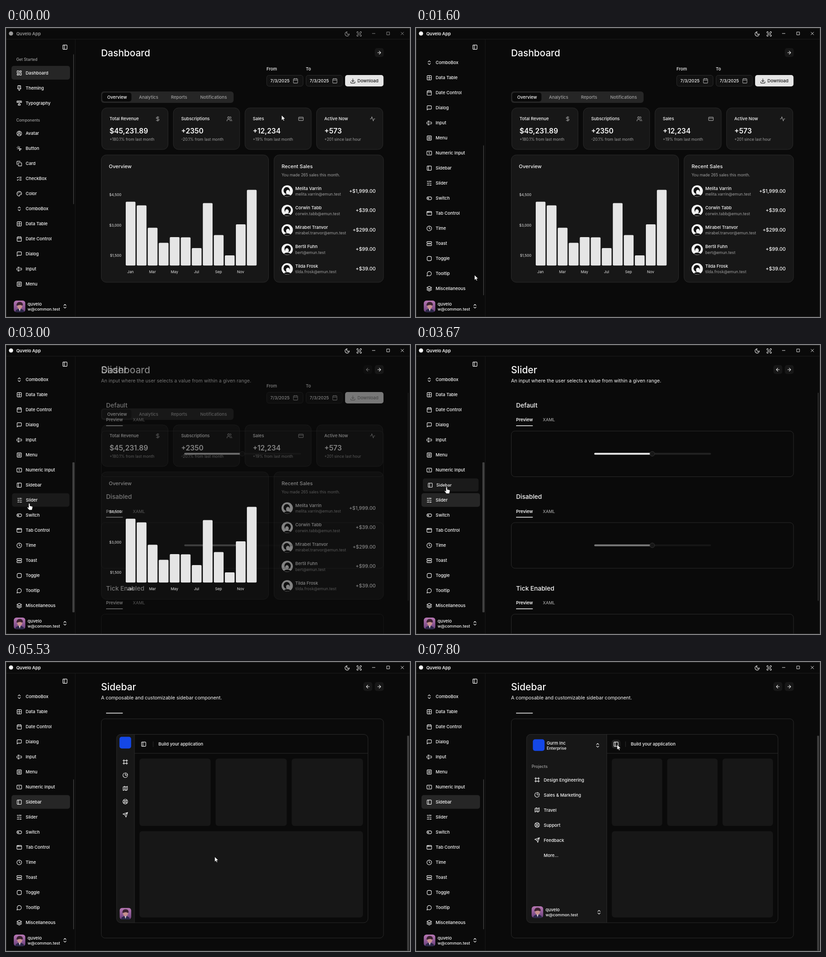
Write an HTML page that moves like this. It is 884 px wide and 633 px high and loops after 8 s.

```html
<!DOCTYPE html>
<html lang="en">
<head>
<meta charset="utf-8">
<title>Dashboard demo</title>
<style>
html, body { margin: 0; width: 100%; height: 100%; overflow: hidden; background: #0a0a0a; }
svg { display: block; font-family: Inter, "Open Sans", sans-serif; }
text { dominant-baseline: central; white-space: pre; }
</style>
</head>
<body>
<svg id="stage" width="884" height="633" viewBox="0 0 884 633"></svg>
<script>
const WHITE = '#fafafa', GRAY = '#a1a1a1', LIGHT = '#e5e5e5', CARD = '#171717', LINE = '#2b2b2b', BG = '#0a0a0a';

// path pieces on a 24 unit grid
const box = (x, y, w, h, r = 2) =>
  `M${x + r} ${y}h${w - 2 * r}a${r} ${r} 0 0 1 ${r} ${r}v${h - 2 * r}a${r} ${r} 0 0 1 ${-r} ${r}h${2 * r - w}a${r} ${r} 0 0 1 ${-r} ${-r}v${2 * r - h}a${r} ${r} 0 0 1 ${r} ${-r}z`;
const ring = (x, y, r) => `M${x - r} ${y}a${r} ${r} 0 1 0 ${2 * r} 0a${r} ${r} 0 1 0 ${-2 * r} 0z`;
const square = box(3, 3, 18, 18);

const ICONS = {
  Dashboard: box(3, 3, 7, 9, 1) + box(14, 3, 7, 5, 1) + box(14, 12, 7, 9, 1) + box(3, 16, 7, 5, 1),
  Theming: 'M10 2v2M14 2v4M17 2a1 1 0 0 1 1 1v9H6V3a1 1 0 0 1 1-1zM6 12a1 1 0 0 0-1 1v1a2 2 0 0 0 2 2h2a1 1 0 0 1 1 1v3a2 2 0 1 0 4 0v-3a1 1 0 0 1 1-1h2a2 2 0 0 0 2-2v-1a1 1 0 0 0-1-1',
  Typography: 'M14 17h1a2 2 0 0 1 0 4H9a2 2 0 0 1 0-4h1V7H6v1a2 2 0 0 1-4 0V5a2 2 0 0 1 2-2h16a2 2 0 0 1 2 2v3a2 2 0 0 1-4 0V7h-4z',
  Avatar: ring(12, 12, 10) + ring(12, 10, 4) + 'M18 20a6 6 0 0 0-12 0',
  Button: 'M14 4.1 12 6M5.1 8l-2.9-.8M6 12l-1.9 2M7.2 2.2 8 5.1M9 9l12 5-5 1.5-1.5 5.5z',
  Card: box(8, 8, 14, 14) + 'M4 16a2 2 0 0 1-2-2V4a2 2 0 0 1 2-2h10a2 2 0 0 1 2 2',
  CheckBox: 'M3 17l2 2 4-4M3 7l2 2 4-4M13 6h8M13 12h8M13 18h8',
  Color: 'M12 2a10 10 0 0 0 0 20c1 0 1.6-.7 1.6-1.7 0-.8-.8-1.2-.8-2.2a1.6 1.6 0 0 1 1.7-1.7h2c3 0 5.5-2.5 5.5-5.5C22 6 17.5 2 12 2z' + ring(13.5, 6.5, .5) + ring(17.5, 10.5, .5) + ring(8.5, 7.5, .5) + ring(6.5, 12.5, .5),
  ComboBox: 'M7 15l5 5 5-5M7 9l5-5 5 5',
  'Data Table': square + 'M12 3v18M3 12h18',
  'Date Control': box(3, 4, 18, 18) + 'M8 2v4M16 2v4M3 10h18',
  Dialog: 'M21 15a2 2 0 0 1-2 2H7l-4 4V5a2 2 0 0 1 2-2h14a2 2 0 0 1 2 2z',
  Input: 'M12 20h-1a2 2 0 0 1-2-2 2 2 0 0 1-2 2H6M13 8h7a2 2 0 0 1 2 2v4a2 2 0 0 1-2 2h-7M5 16H4a2 2 0 0 1-2-2v-4a2 2 0 0 1 2-2h1M6 4h1a2 2 0 0 1 2 2 2 2 0 0 1 2-2h1M9 6v12',
  Menu: square + 'M7 8h10M7 12h10M7 16h10',
  'Numeric Input': box(2, 4, 20, 16) + 'M10 9h2v6',
  Sidebar: square + 'M9 3v18',
  Slider: 'M21 4h-7M10 4H3M21 12h-9M8 12H3M21 20h-5M12 20H3M14 2v4M8 10v4M16 18v4',
  Switch: box(2, 6, 20, 12, 6) + ring(8, 12, 2),
  'Tab Control': box(2, 4, 20, 16) + 'M2 8h20M6 4v4M10 4v4',
  Time: ring(12, 12, 10) + 'M12 6v6l4 2',
  Toast: box(2, 4, 20, 7) + box(2, 14, 20, 7),
  Toggle: box(3, 3, 18, 18, 5),
  Tooltip: 'M7.9 20A9 9 0 1 0 4 16.1L2 22z',
  Miscellaneous: 'M12 2 2 7l10 5 10-5zM2 12l10 5 10-5M2 17l10 5 10-5',
  moon: 'M12 3a6 6 0 0 0 9 9 9 9 0 1 1-9-9z',
  scan: 'M3 8V3h5M16 3h5v5M21 16v5h-5M8 21H3v-5' + box(7, 8, 10, 8),
  left: 'M12 19l-7-7 7-7M19 12H5',
  right: 'M5 12h14M12 5l7 7-7 7',
  download: 'M21 15v4a2 2 0 0 1-2 2H5a2 2 0 0 1-2-2v-4M7 10l5 5 5-5M12 15V3',
  dollar: 'M12 2v20M17 5H9.5a3.5 3.5 0 0 0 0 7h5a3.5 3.5 0 0 1 0 7H6',
  users: ring(9, 7, 4) + 'M16 21v-2a4 4 0 0 0-4-4H6a4 4 0 0 0-4 4v2M22 21v-2a4 4 0 0 0-3-3.9M16 3.1a4 4 0 0 1 0 7.8',
  credit: box(2, 5, 20, 14) + 'M2 10h20',
  pulse: 'M22 12h-4l-3 9L9 3l-3 9H2',
  frame: 'M22 6H2M22 18H2M6 2v20M18 2v20',
  pie: 'M22 12a10 10 0 0 0-10-10v10zM21.2 15.9A10 10 0 1 1 8 2.8',
  map: 'M3 6l6-3 6 3 6-3v15l-6 3-6-3-6 3zM9 3v15M15 6v15',
  buoy: ring(12, 12, 10) + ring(12, 12, 4) + 'M5 5l4 4M15 9l4-4M15 15l4 4M9 15l-4 4',
  send: 'M22 2 11 13M22 2l-7 20-4-9-9-4z'
};

// markup helpers; text and icons are placed by their middle
const text = (x, y, s, size = 9.5, fill = WHITE, weight = 500, anchor = 'start') =>
  `<text x="${x}" y="${y}" font-size="${size}" fill="${fill}" font-weight="${weight}" text-anchor="${anchor}">${s}</text>`;
const rect = (x, y, w, h, r, fill, stroke = 'none', more = '') =>
  `<rect x="${x}" y="${y}" width="${w}" height="${h}" rx="${r}" fill="${fill}" stroke="${stroke}" ${more}/>`;
const icon = (x, y, name, color = WHITE, size = 12.4) =>
  `<path transform="translate(${x - size / 2} ${y - size / 2}) scale(${size / 24})" d="${ICONS[name]}" fill="none" stroke="${color}" stroke-width="2.1" stroke-linecap="round" stroke-linejoin="round"/>`;
const group = (id, body, more = '') => `<g id="${id}" ${more}>${body}</g>`;

const portrait = (x, y) => `<g transform="translate(${x} ${y})" clip-path="url(#face)">
  <rect width="25.5" height="25.5" fill="url(#pink)"/>
  <path d="M3 26q1-8 10-8t10 8z" fill="#2c2848"/><path d="M11 18h4l-2 6z" fill="#d9cfe0"/>
  <ellipse cx="13" cy="12" rx="5.5" ry="6.5" fill="#c58f8d"/><path d="M6 11q0-8 7-8t7 7l-2 1q-4-3-10 0z" fill="#3d2231"/></g>`;
const user = (x, y) => text(x, y, 'quvelo', 9.6) + text(x, y + 10.8, 'w@common.test', 8.8);
const navButton = (x, name) => rect(x, 44, 19.5, 19.5, 5, CARD) + icon(x + 9.7, 54, name, WHITE, 11.5);
const tabs = y => text(219, y, 'Preview', 9.5, WHITE, 600) + text(277.5, y, 'XAML', 9.2, GRAY) + rect(219, y + 12.3, 36.5, 1.5, 0, WHITE);

// left menu
const names = Object.keys(ICONS).slice(0, 24);
const itemY = names.map((n, i) => i < 3 ? 98 + 33 * i : 230.5 + 33 * (i - 3));
const menu = text(22.5, 69, 'Get Started', 8.5, GRAY) + text(22.5, 201.5, 'Components', 8.5, GRAY) +
  names.map((n, i) => `<g class="item">${rect(12, itemY[i] - 15, 128, 30, 5, 'none')}${icon(29, itemY[i] + .5, n)}${text(43, itemY[i], n)}</g>`).join('');

// dashboard page
const stats = [
  ['Total Revenue', '$45,231.89', '+180.1% from last month', 'dollar'],
  ['Subscriptions', '+2350', '-20.1% from last month', 'users'],
  ['Sales', '+12,234', '+19% from last month', 'credit'],
  ['Active Now', '+573', '+201 since last hour', 'pulse']
].map(([a, b, c, ic], i) => {
  const x = 209.5 + 156.7 * i;
  return rect(x, 175, 145, 91, 11, CARD, LINE) + text(x + 17, 198.5, a) + text(x + 17, 225, b, 15.4, WHITE, 600) +
    text(x + 17, 243.5, c, 8.5, GRAY, 400) + icon(x + 122.5, 199, ic, GRAY);
}).join('');

const sales = [
  ['Melita Varrin', 'melita.varrin', '1,999'], ['Corwin Tabb', 'corwin.tabb', '39'],
  ['Mirabel Tranvor', 'mirabel.tranvor', '299'], ['Bertil Fuhn', 'bert', '99'], ['Tilda Frosk', 'tilda.frosk', '39']
].map(([n, mail, sum], i) => {
  const y = 357 + 42.6 * i, lean = i % 2 ? 1 : -1;
  return `<g><circle cx="615.3" cy="${y}" r="12.4" fill="#f4f4f4"/>
    <path d="M608 ${y + 10}q7 -6 15 0q-7 4 -15 0" fill="#111"/>
    <ellipse cx="${615.3 + lean}" cy="${y - 1}" rx="7" ry="7.5" fill="#111"/>
    <ellipse cx="${615.8 - lean}" cy="${y + 2.5}" rx="4" ry="5" fill="#f4f4f4"/></g>` +
    text(633, y - 6, n) + text(633, y + 7, mail + '@emun.test', 8.7, GRAY, 400) +
    text(809, y, `+$${sum}.00`, 10.7, WHITE, 500, 'end');
}).join('');

const dateBox = (x, label) => text(x, 89.5, label) + rect(x + .5, 103.5, 79.5, 24, 5, '#121212', LINE) +
  text(x + 8.5, 115.5, '7/3/2025') + icon(x + 63.5, 115.5, 'Date Control', GRAY);

const dash = text(208, 54, 'Dashboard', 20.6) + dateBox(570, 'From') + dateBox(656, 'To') +
  rect(742, 103, 84, 25, 5, LIGHT) + icon(759, 116, 'download', '#222') + text(769, 115.5, 'Download', 9.6, '#171717') +
  rect(208, 139, 290, 25, 6, '#262626') + rect(210.5, 141.5, 64, 19.5, 5, BG) + text(221.5, 151.5, 'Overview') +
  text(291, 151.5, 'Analytics', 9.5, GRAY) + text(361, 151.5, 'Reports', 9.5, GRAY) + text(425, 151.5, 'Notifications', 9.6, GRAY) +
  stats + rect(208.5, 278, 366, 279, 11, CARD, LINE) + rect(586.5, 278, 239.5, 279, 11, CARD, LINE) +
  text(225, 302.5, 'Overview', 11) + text(603, 302.5, 'Recent Sales', 11) +
  text(603, 322, 'You made 265 sales this month.', 8.5, GRAY, 400) + sales;

const tops = [380.5, 388.5, 437.5, 470.5, 458, 458.5, 482, 383.5, 453.5, 498, 430, 354.5];
const chart = tops.map((y, i) => rect(262 + 24.1 * i, y, 21.3, 520.3 - y, 2, LIGHT)).join('') +
  ['Jan', 'Mar', 'May', 'Jul', 'Sep', 'Nov'].map((m, i) => text(272.3 + 48.2 * i, 534, m, 8.2, LIGHT, 400, 'middle')).join('') +
  ['$4,500', '$3,000', '$1,500'].map((s, i) => text(252.5, 365 + 66.5 * i, s, 7.9, LIGHT, 400, 'end')).join('');

// slider page
const sliderPage = text(208, 54, 'Slider', 20.8) +
  text(208, 78.5, 'An input where the user selects a value from within a given range.', 10.55, WHITE, 400) +
  ['Default', 'Disabled', 'Tick Enabled'].map((s, i) => `<g transform="translate(0 ${200.5 * i})">` +
    text(219, 131.5, s, 13.6) + tabs(163.7) + rect(208.5, 188.5, 617.5, 100, 8, 'none', LINE) +
    (i < 2 ? `<g opacity="${i ? .5 : 1}">` + rect(390, 236.3, 255.5, 4, 2, '#222') + rect(390, 236.3, 127, 4, 2, LIGHT) + '</g>' +
      `<circle cx="517" cy="238.3" r="5.2" fill="${CARD}" stroke="#333"/>` : '') + '</g>').join('');

// sidebar page, laid out at its scrolled position
const projects = [['frame', 'Design Engineering'], ['pie', 'Sales &amp; Marketing'], ['map', 'Travel'], ['buoy', 'Support'], ['send', 'Feedback']];
const demo = text(219, 66.5, 'Default', 13.6) + tabs(98.9) + rect(208.5, 124.5, 617.5, 480, 8, 'none', LINE) +
  '<g clip-path="url(#inner)">' + rect(242, 158, 0, 413, 0, CARD, 'none', 'id="panel"') +
  rect(249, 165, 162, 34, 6, '#262626', 'none', 'id="teamHover"') + group('team', rect(-12.8, -12.8, 25.6, 25.6, 5, '#1447e6')) +
  projects.map(([n]) => `<g class="tool">${icon(0, 0, n)}</g>`).join('') + group('face2', portrait(0, 0)) +
  '<g clip-path="url(#panelClip)">' + group('labels', text(286, 177.5, 'Gurm Inc') + text(286, 188.3, 'Enterprise', 8.8) + icon(397.5, 182.5, 'ComboBox') +
    text(253, 228.5, 'Projects', 9, GRAY) + projects.map(([, s], i) => text(279.5, 258 + 33 * i, s)).join('') +
    text(279.5, 423, 'More...') + user(283.5, 542.5) + icon(400.5, 548, 'ComboBox')) + '</g>' +
  group('head', rect(0, 158, 1, 413, 0, LINE) + rect(0, 199.5, 600, 1, 0, LINE) + rect(11.5, 170.5, 18.5, 18.5, 5, '#222', 'none', 'id="toggleHover"') +
    icon(20.7, 180, 'Sidebar') + rect(41, 174, 1, 12, 0, LINE) + text(53, 179.5, 'Build your application')) +
  Array.from({ length: 4 }, () => rect(0, 211.5, 0, 147.5, 6, CARD, 'none', 'class="tile"')).join('') + '</g>' +
  rect(242, 158.5, 550, 412.5, 9, 'none', LINE);
const sidebarPage = text(208, 54, 'Sidebar', 20.8) + text(208, 78.5, 'A composable and customizable sidebar component.', 10.55, WHITE, 400) +
  `<g clip-path="url(#view)">${group('demo', demo)}</g>`;

const clip = (id, body) => `<clipPath id="${id}">${body}</clipPath>`;
stage.innerHTML = '<defs>' +
  '<linearGradient id="pink" x2="0" y2="1"><stop stop-color="#b878b4"/><stop offset="1" stop-color="#6a3f7c"/></linearGradient>' +
  clip('face', rect(0, 0, 25.5, 25.5, 6)) + clip('list', rect(0, 58, 152, 528, 0)) + clip('view', rect(152, 104.5, 732, 529, 0)) +
  clip('inner', rect(242, 158, 550, 413, 9)) + clip('panelClip', rect(242, 158, 0, 413, 0, BG, 'none', 'id="panelCut"')) + '</defs>' +
  rect(0, 0, 884, 633, 0, BG) + rect(0, 24, 884, 1, 0, '#1c1c1c') + rect(151, 25, 1, 608, 0, '#181818') +
  group('bar', `<circle cx="11" cy="12" r="4.6" fill="${WHITE}"/>` + text(22.5, 12, 'Quvelo App', 9.5, WHITE, 600) +
    icon(746.5, 13, 'moon') + icon(772.7, 13, 'scan') +
    `<path d="M801 12h7M833 8.8h6.2v6.2h-6.2zM864 8.8l6.5 6.5m0-6.5l-6.5 6.5" fill="none" stroke="${WHITE}" stroke-width=".9"/>`) +
  icon(129, 42, 'Sidebar') + `<g clip-path="url(#list)">${group('menu', menu)}</g>` +
  rect(0, 0, 0, 328.5, 1.2, '#404040', 'none', 'id="thumb"') +
  portrait(17, 597) + user(47.3, 604.3) + icon(129, 609.5, 'ComboBox') +
  group('dash', dash) + group('slider', sliderPage) + group('side', sidebarPage) + group('chart', chart) +
  group('back', navButton(782, 'left')) + navButton(807, 'right') +
  rect(0, 0, 0, 0, 1, '#404040', 'none', 'id="pageThumb"') + rect(.5, .5, 883, 632, 0, 'none', '#303030') +
  group('arrow', '<path d="M0 0v11.2l2.6-2.3 1.7 3.7 1.9-.9-1.7-3.6h3.6z" fill="#fff" stroke="#000" stroke-width=".7"/>') +
  group('hand', '<path d="M-1.5 1.2a1.4 1.4 0 0 1 2.8 0v4l5 1.2q1 .4 1 1.6l-.7 4-1 2.6h-6l-4-5q-.4-1.6 1-1.6l1.9 1.4z" fill="#fff" stroke="#000" stroke-width=".7"/>');

const $ = id => document.getElementById(id);
const all = q => [...stage.querySelectorAll(q)];
const items = all('.item'), tools = all('.tool'), tiles = all('.tile'), dashParts = all('#dash > *');
const put = (el, attrs) => { for (const k in attrs) el.setAttribute(k, attrs[k]); };
const move = (el, x, y) => put(el, { transform: `translate(${x} ${y})` });
const show = (id, o) => put($(id), { opacity: o, display: o > 0 ? 'inline' : 'none' });
const mix = (a, b, p) => a + (b - a) * p;
const ramp = (t, a, b) => Math.min(1, Math.max(0, (t - a) / (b - a)));
const ease = p => p * p * (3 - 2 * p);

// linear track of [time, ...values]
function track(t, keys) {
  const i = keys.findIndex(k => k[0] > t);
  if (i < 0) return keys.at(-1).slice(1);
  if (!i) return keys[0].slice(1);
  const a = keys[i - 1], b = keys[i], p = ramp(t, a[0], b[0]);
  return a.slice(1).map((v, j) => mix(v, b[j + 1], p));
}
const POINTER = [[70, 603, 191], [560, 132, 297], [730, 146, 309], [870, 146, 309], [1070, 146, 317], [1450, 147, 508.5],
  [1600, 128, 541], [1800, 128, 541], [2330, 51, 347], [3330, 51, 347], [3570, 67, 311], [4070, 67, 311], [4670, 305, 246],
  [4870, 305, 246], [5000, 457, 427], [5530, 457, 427], [6000, 306, 187], [6070, 306, 187], [6270, 302, 179], [7200, 302, 179], [7800, 440, 181]];
const PRESS = {
  Slider: [[2600, 1], [2700, .95], [2900, .95], [3060, 1]],
  Sidebar: [[3570, 1], [3660, .953], [3740, .953], [3900, 1]]
};

function draw(t) {
  const [x, y] = track(t, POINTER);
  const dragging = t >= 870 && t < 1800;
  const drag = t < 870 ? 0 : t < 1450 ? y - 309 : 199.5;
  const scroll = drag * 1.604;
  const inList = x > 12 && x < 140 && y > 58 && y < 586 && !dragging;
  const selected = t < 3060 ? 'Dashboard' : t < 3760 ? 'Slider' : 'Sidebar';

  put($('bar'), { opacity: t < 870 ? .6 : 1 });
  move($('menu'), 0, -scroll);
  let hovering = false;
  items.forEach((el, i) => {
    const over = inList && Math.abs(y - itemY[i] + scroll) < 15;
    hovering ||= over;
    put(el.firstChild, { fill: names[i] === selected ? '#262626' : over ? '#1a1a1a' : 'none' });
    const s = PRESS[names[i]] ? track(t, PRESS[names[i]])[0] : 1;
    put(el, { transform: `translate(${76 * (1 - s)} ${itemY[i] * (1 - s)}) scale(${s})` });
  });
  const wide = track(t, [[520, 0], [620, 1], [1480, 1], [1580, 0], [1800, 0], [1900, 1], [4250, 1], [4350, 0]])[0];
  put($('thumb'), { x: mix(147, 145.3, wide), y: 57.5 + drag, width: mix(1.5, 4.7, wide) });

  // pages: the dashboard fades part by part, its chart stays until the end
  const toSlider = ramp(t, 2890, 3140), toSide = ramp(t, 3680, 3940);
  const dashFade = 1 - ramp(t, 2860, 3140);
  dashParts.forEach(el => put(el, { opacity: dashFade }));
  show('chart', t < 3130 ? 1 : 0);
  show('slider', toSlider * (1 - toSide));
  show('side', toSide);
  show('back', toSlider);
  const pageScroll = ease(ramp(t, 5180, 5420));
  const thick = ramp(t, 4250, 4400), sidePage = toSide > .5;
  put($('pageThumb'), { x: mix(879.3, 877.8, thick), width: mix(1.5, 4.2, thick), y: 104.5 + 57 * pageScroll,
    height: sidePage ? 472 : 456, opacity: toSlider });
  move($('demo'), 0, 65 * (1 - pageScroll));

  // inner sidebar opening
  const open = ease(ramp(t, 6500, 6870)), edge = mix(281, 417.5, open);
  put($('panel'), { width: edge - 242 });
  put($('panelCut'), { width: edge - 242 });
  put($('labels'), { opacity: open });
  move($('head'), edge - .5, 0);
  move($('team'), mix(261, 268.5, open), mix(176.6, 182, open));
  move($('face2'), mix(248.5, 253, open), mix(538.5, 535, open));
  tools.forEach((el, i) => move(el, mix(261, 265, open), mix(219 + 28.9 * i, 258 + 33 * i, open)));
  const left = edge + 11, w = (781 - left - 21.5) / 3;
  tiles.forEach((el, i) => put(el, i < 3 ? { x: left + i * (w + 10.75), width: w } : { x: left, y: 370.5, width: 781 - left, height: 189 }));
  put($('toggleHover'), { opacity: sidePage && Math.abs(x - edge - 20.5) < 10 && Math.abs(y - 180) < 10 ? 1 : 0 });
  put($('teamHover'), { opacity: open === 1 && x < 411 ? 1 : 0 });

  show('hand', hovering ? 1 : 0);
  show('arrow', hovering ? 0 : 1);
  move($('hand'), x, y);
  move($('arrow'), x, y);
}

const start = performance.now();
(function loop() {
  draw((performance.now() - start) % 8000);
  requestAnimationFrame(loop);
})();
</script>
</body>
</html>
```
